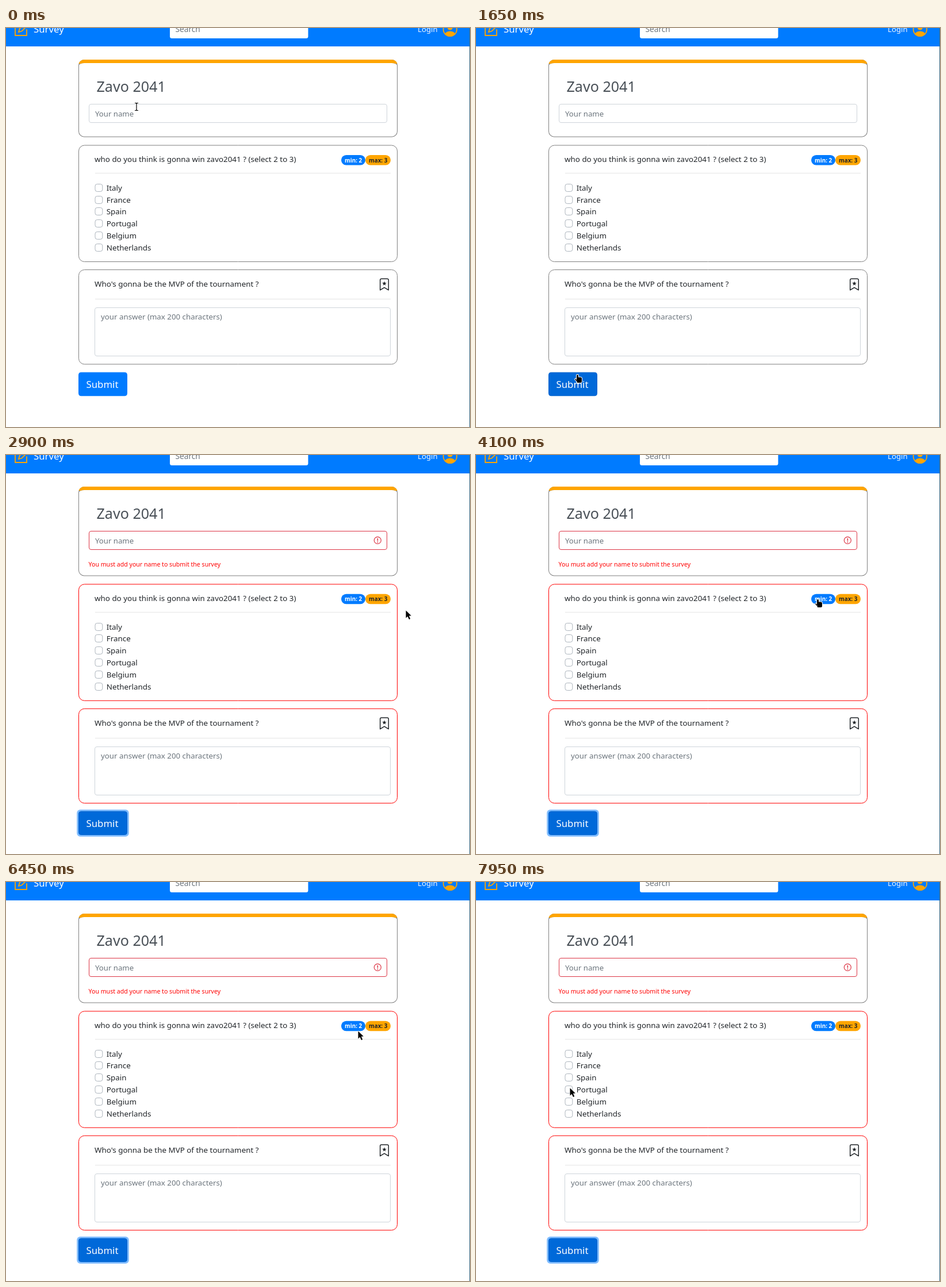
Write an HTML page with a canvas that moves like this. It is 807 px wide and 694 px high and loops after 8 s.

```html
<!DOCTYPE html>
<html lang="en">
<head>
<meta charset="utf-8">
<title>Survey</title>
<style>
  html, body { margin: 0; width: 100%; height: 100%; overflow: hidden; background: #fff; }
  canvas { display: block; }
</style>
</head>
<body>
<canvas id="stage" width="807" height="694"></canvas>
<script>
const ctx = document.getElementById('stage').getContext('2d');
const LOOP = 8000, ERROR_AT = 2050, SHIFT = 20.8;
const BLUE = '#007bff', ORANGE = '#ffa500', INK = '#212529', MUTED = '#6c757d';
const GREY = '#808080', RED = '#ff0000', DANGER = '#dc3545', EDGE = '#ced4da';
const TEAMS = ['Italy', 'France', 'Spain', 'Portugal', 'Belgium', 'Netherlands'];

// Pointer moves: start, end, number of jumps, points passed on the way.
const MOVES = [
  [350, 1250, 16, [[227, 137], [222, 165], [213, 240], [200, 350], [189, 470], [181, 570], [177, 603]]],
  [2800, 2900, 2, [[177, 603], [480, 400], [696, 271]]],
  [3200, 4100, 8, [[696, 271], [680, 268], [655, 258], [622, 249], [595, 251]]],
  [4250, 4750, 5, [[595, 251], [618, 246], [604, 250], [598, 248]]],
  [5050, 5950, 8, [[598, 248], [595, 249], [604, 261], [618, 251], [624, 240]]],
  [6100, 6750, 6, [[624, 240], [620, 254], [613, 260], [590, 276], [567, 285]]],
  [7050, 7950, 8, [[567, 285], [440, 390], [270, 560], [120, 646], [22, 570], [60, 440], [125, 378], [164, 359]]]
];

function along(points, p) {
  const s = p * (points.length - 1), i = Math.min(Math.floor(s), points.length - 2), f = s - i;
  return [0, 1].map(k => Math.round(points[i][k] + (points[i + 1][k] - points[i][k]) * f));
}

function pointerAt(t) {
  let pos = MOVES[0][3][0];
  for (const [start, end, steps, points] of MOVES) {
    if (t < start) break;
    const n = Math.floor(Math.min(1, (t - start) / (end - start)) * (steps - 1)) + 1;
    pos = along(points, n / steps);
  }
  return pos;
}

function inside([x, y], l, t, r, b) {
  return x >= l && x <= r && y >= t && y <= b;
}

function pointerShape(pos, t, dy) {
  if (t >= ERROR_AT && t < 2500) return 'hand';
  if (inside(pos, 126, 599 + dy, 211, 640 + dy) || inside(pos, 583, 221 + dy, 669, 239 + dy)) return 'hand';
  const typing = inside(pos, 144, 132, 663, 165) || inside(pos, 154, 486 + dy, 669, 571 + dy);
  const prose = inside(pos, 154, 221 + dy, 504, 237 + dy) || inside(pos, 154, 438 + dy, 440, 454 + dy);
  return typing || prose ? 'beam' : 'arrow';
}

function text(str, x, y, size, color, weight = 400) {
  ctx.font = `${weight} ${size}px "Noto Sans", "Open Sans", sans-serif`;
  ctx.fillStyle = color;
  ctx.fillText(str, x, Math.round(y));
}

function box(l, t, r, b, radius, fill, stroke, width = 1) {
  const h = stroke ? width / 2 : 0;
  ctx.beginPath();
  ctx.roundRect(l + h, t + h, r - l - 2 * h, b - t - 2 * h, radius);
  if (fill) { ctx.fillStyle = fill; ctx.fill(); }
  if (stroke) { ctx.strokeStyle = stroke; ctx.lineWidth = width; ctx.stroke(); }
}

function path(points, close) {
  ctx.beginPath();
  points.forEach(([x, y]) => ctx.lineTo(x, y));
  if (close) ctx.closePath();
}

function disc(x, y, r) {
  ctx.beginPath();
  ctx.arc(x, y, r, 0, 7);
}

function rule(y) {
  ctx.fillStyle = '#e5e5e5';
  ctx.fillRect(155, Math.round(y), 514, 1);
}

function navbar() {
  ctx.fillStyle = BLUE;
  ctx.fillRect(0, 0, 807, 32);
  box(285, -12, 525.5, 18, 3.5, '#fff');
  text('Search', 294.5, 7, 13.7, MUTED);
  text('Survey', 48, 8, 16.8, '#fff');
  text('Login', 716, 7, 13.2, '#f2f7ff');

  ctx.strokeStyle = ctx.fillStyle = ORANGE;
  ctx.lineWidth = 1.8;
  ctx.lineCap = 'round';
  path([[16, -5], [16, 13], [36, 13], [36, 3]]);
  ctx.stroke();
  path([[22, 7], [23.5, 1.5], [35, -10], [39, -6], [27.5, 5.5]], true);
  ctx.stroke();
  disc(772.3, 2.5, 11.7);
  ctx.stroke();
  disc(772.3, -1, 4.5);
  ctx.fill();
  ctx.beginPath();
  ctx.ellipse(772.3, 11, 8.7, 5.5, 0, Math.PI, 0);
  ctx.quadraticCurveTo(772.3, 17, 763.6, 11);
  ctx.fill();
  ctx.lineCap = 'butt';
}

function titleCard(failed) {
  const bottom = failed ? 210.5 : 189.7;
  const frame = () => {
    ctx.beginPath();
    ctx.roundRect(126, 55, 555, bottom - 55, 10);
    ctx.roundRect(127, 61, 553, bottom - 62, [{ x: 9, y: 4 }, { x: 9, y: 4 }, 9, 9]);
    ctx.fill('evenodd');
  };
  ctx.fillStyle = GREY;
  frame();
  ctx.save();
  ctx.beginPath();
  ctx.rect(126, 55, 555, 7);
  ctx.clip();
  ctx.fillStyle = ORANGE;
  frame();
  ctx.restore();

  text('Zavo 2041', 157.5, 111, 25.1, '#495057');
  box(144, 132, 663, 165, 3.5, '#fff', failed ? DANGER : EDGE);
  text('Your name', 155, 154, 13.2, MUTED);
  if (!failed) return;
  ctx.strokeStyle = ctx.fillStyle = DANGER;
  ctx.lineWidth = 1.2;
  disc(646.3, 148.4, 6);
  ctx.stroke();
  ctx.fillRect(645.6, 144.8, 1.5, 4.6);
  disc(646.3, 151.4, 0.95);
  ctx.fill();
  text('You must add your name to submit the survey', 143.5, 194, 10.6, RED);
}

function badge(str, l, r, dy, fill, color) {
  box(l, 221 + dy, r, 238.5 + dy, 8.7, fill);
  text(str, l + 6, 233.5 + dy, 9.9, color, 700);
}

function choiceCard(dy, border) {
  box(126, 203.5 + dy, 681, 407 + dy, 10, '#fff', border);
  text('who do you think is gonna win zavo2041 ? (select 2 to 3)', 154, 233.2 + dy, 13.4, INK);
  badge('min: 2', 583, 625, dy, BLUE, '#fff');
  badge('max: 3', 625, 669, dy, ORANGE, INK);
  rule(252 + dy);
  TEAMS.forEach((name, i) => {
    const y = 277.7 + dy + i * SHIFT, top = Math.round(y - 6.9);
    box(154.5, top, 168.3, top + 13.9, 3.5, '#fff', '#adb5bd');
    text(name, 174.7, y + 5, 13.4, INK);
  });
}

function bookmark(x, y) {
  ctx.strokeStyle = ctx.fillStyle = INK;
  ctx.lineWidth = 1.5;
  ctx.lineJoin = 'round';
  ctx.beginPath();
  ctx.moveTo(x - 7.3, y + 20.3);
  ctx.lineTo(x - 7.3, y + 3);
  ctx.quadraticCurveTo(x - 7.3, y + 0.8, x - 5, y + 0.8);
  ctx.lineTo(x + 5, y + 0.8);
  ctx.quadraticCurveTo(x + 7.3, y + 0.8, x + 7.3, y + 3);
  ctx.lineTo(x + 7.3, y + 20.3);
  ctx.lineTo(x, y + 15.8);
  ctx.closePath();
  ctx.stroke();
  path(Array.from({ length: 10 }, (_, i) => {
    const a = i * Math.PI / 5, r = i % 2 ? 1.7 : 4;
    return [x + r * Math.sin(a), y + 9 - r * Math.cos(a)];
  }), true);
  ctx.fill();
  ctx.lineJoin = 'miter';
}

function answerCard(dy, border) {
  box(126, 420 + dy, 681, 585.3 + dy, 10, '#fff', border);
  text("Who's gonna be the MVP of the tournament ?", 154, 450.2 + dy, 13.4, INK);
  bookmark(658, 435.5 + dy);
  rule(470.7 + dy);
  const top = Math.round(486 + dy);
  box(154, top, 669, top + 85, 3.5, '#fff', EDGE);
  text('your answer (max 200 characters)', 165, 506.8 + dy, 13.3, MUTED);
  // Resting grip line of the field is hidden, so the box stays empty.
}

function submitButton(t, dy) {
  const fill = t < 1250 ? BLUE : t < 1650 ? '#0074ef' : '#0069d9';
  const top = 598.7 + dy;
  if (t >= ERROR_AT) {
    const spread = t < 2150 ? 1.5 : 2.8;
    box(126 - spread, top - spread, 211 + spread, top + 41.5 + spread, 6, 'rgba(0,123,255,0.5)');
  }
  box(126, top, 211, top + 41.5, 4, fill, t >= 1650 ? '#0062cc' : fill);
  text('Submit', 139.5, 626 + dy, 16.8, '#fff');
}

function drawPointer(shape, x, y) {
  ctx.save();
  ctx.translate(x, y);
  ctx.lineJoin = 'round';
  ctx.strokeStyle = '#fff';
  ctx.fillStyle = '#000';
  if (shape === 'arrow') {
    path([[-0.5, -0.5], [-0.5, 12.5], [2.6, 9.7], [5, 15], [7.2, 14], [4.9, 8.8], [8.8, 8.4]], true);
    ctx.lineWidth = 1.2;
    ctx.stroke();
    ctx.fill();
  } else if (shape === 'hand') {
    ctx.beginPath();
    ctx.roundRect(-2, 0, 3, 9, 1.5);
    ctx.roundRect(-2, 4.5, 9, 9.5, 2.5);
    ctx.moveTo(-2, 9.5);
    ctx.lineTo(-4, 6.8);
    ctx.lineTo(-5, 8);
    ctx.lineTo(-1, 13);
    ctx.closePath();
    ctx.lineWidth = 2;
    ctx.stroke();
    ctx.fill();
  } else {
    const beam = () => {
      path([[-3, -6.5], [-1, -6.5], [0, -5.5], [1, -6.5], [3, -6.5]]);
      ctx.moveTo(0, -5.5);
      ctx.lineTo(0, 5.5);
      ctx.moveTo(-3, 6.5);
      ctx.lineTo(-1, 6.5);
      ctx.lineTo(0, 5.5);
      ctx.lineTo(1, 6.5);
      ctx.lineTo(3, 6.5);
      ctx.stroke();
    };
    ctx.lineWidth = 2.6;
    beam();
    ctx.strokeStyle = '#000';
    ctx.lineWidth = 1.2;
    beam();
  }
  ctx.restore();
}

function draw(t) {
  const failed = t >= ERROR_AT, dy = failed ? SHIFT : 0;
  const border = failed ? RED : GREY;
  ctx.fillStyle = '#fff';
  ctx.fillRect(0, 0, 807, 694);
  navbar();
  titleCard(failed);
  choiceCard(dy, border);
  answerCard(dy, border);
  submitButton(t, dy);
  ctx.fillStyle = '#3a6a85';
  ctx.fillRect(806, 0, 1, 694);
  const pos = pointerAt(t);
  drawPointer(pointerShape(pos, t, dy), ...pos);
}

const began = performance.now();
function tick() {
  draw((performance.now() - began) % LOOP);
  requestAnimationFrame(tick);
}
tick();
</script>
</body>
</html>
```
